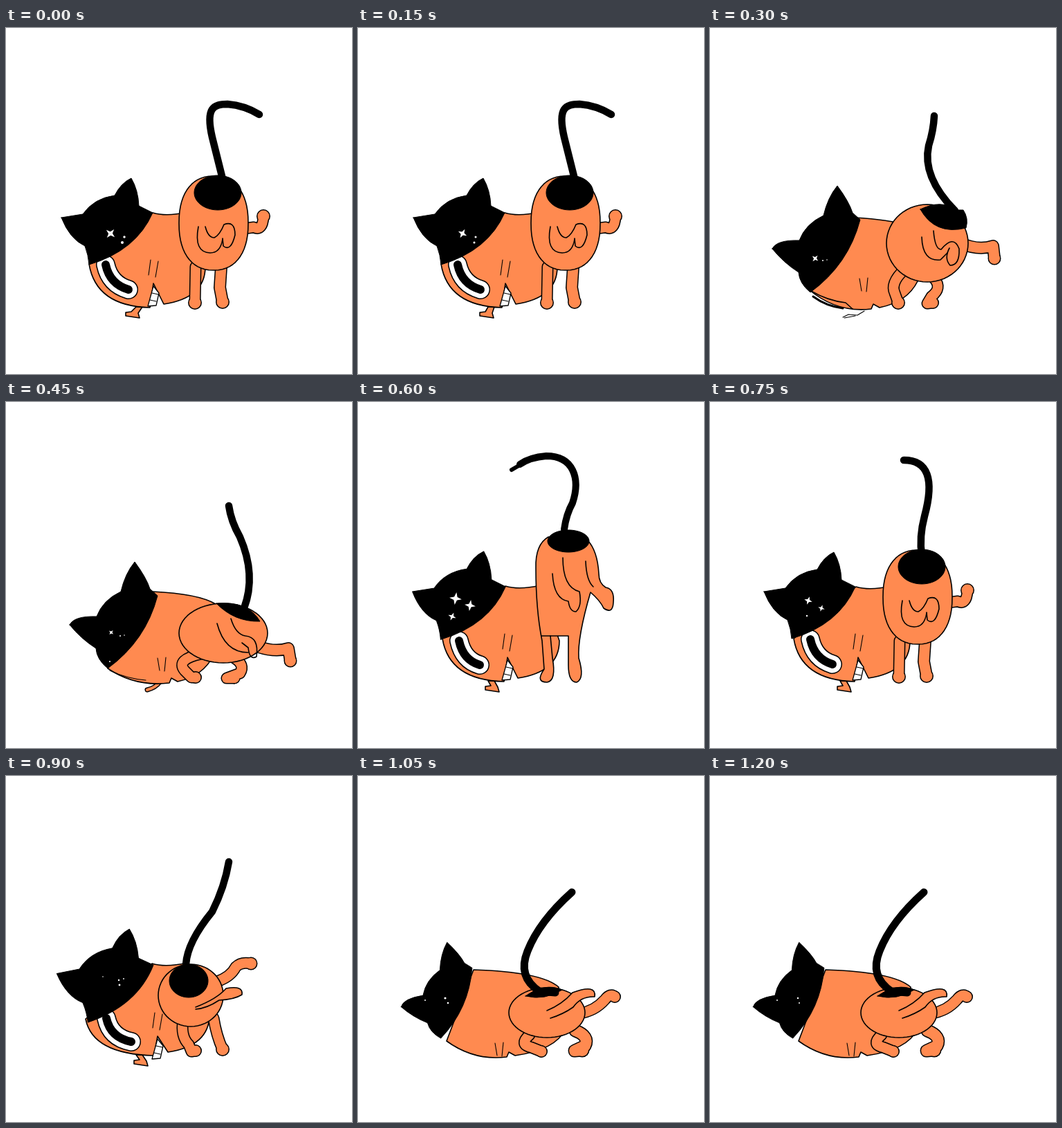
An HTML page for the animation above (1.35 s loop, 500 by 500 pixels).

```html
<!DOCTYPE html>
<html lang="en">
<head>
<meta charset="utf-8">
<title>Tumbling cat</title>
<style>
html, body { margin: 0; width: 100%; height: 100%; overflow: hidden; background: #fff; }
svg { display: block; width: 100%; height: 100%; }
path { fill: none; stroke: #000; stroke-width: 1.6; stroke-linecap: round; stroke-linejoin: round; }
.skin { fill: #ff8a50; }
.fur { fill: #000; stroke-width: 1; }
.white { fill: #fff; stroke-width: 1.3; }
.thin { stroke-width: 1.1; }
.glint { fill: #fff; stroke: none; }
</style>
</head>
<body>
<svg id="stage" viewBox="0 0 500 500"></svg>
<script>
const STEP = 150;
const ORANGE = '#ff8a50';
const stage = document.getElementById('stage');

const shape = (kind, d) => `<path class="${kind}" d="${d}"/>`;
const skin = d => shape('skin', d);
const fur = d => shape('fur', d);
const line = d => shape('line', d);
const thin = d => shape('thin', d);
const stroke = (d, width, color = '#000') =>
  `<path d="${d}" style="stroke:${color};stroke-width:${width}"/>`;
const tail = (d, width = 10.5) => stroke(d, width);
const dot = (x, y, r = 1.2) => `<circle class="glint" cx="${x}" cy="${y}" r="${r}"/>`;

// Moves art around its own centre.
const place = (art, [cx, cy], [x, y], turn = 0, scale = 1) =>
  `<g transform="translate(${x} ${y}) rotate(${turn}) scale(${scale}) translate(${-cx} ${-cy})">${art}</g>`;

// Superellipse: power 2 is an ellipse, more is squarer.
function blob(kind, cx, cy, rx, ry, power = 2) {
  const bend = v => Math.sign(v) * Math.abs(v) ** (2 / power);
  const points = Array.from({ length: 60 }, (_, i) => {
    const a = i * Math.PI / 30;
    return `${cx + rx * bend(Math.cos(a))} ${cy + ry * bend(Math.sin(a))}`;
  });
  return shape(kind, `M${points.join('L')}Z`);
}

function star(x, y, r, turn = 0) {
  const points = Array.from({ length: 8 }, (_, i) => {
    const a = i * Math.PI / 4 + turn, q = i % 2 ? r * 0.36 : r;
    return `${x + q * Math.cos(a)} ${y + q * Math.sin(a)}`;
  });
  return shape('glint', `M${points.join('L')}Z`);
}

// Outlined leg ending in a round paw; the path must end in absolute x y.
function limb(d, end, width = 14, paw = 17) {
  const toe = `M${end}h.01`, knee = `${d} ${end}`;
  return stroke(knee, width + 3) + stroke(toe, paw + 3)
    + stroke(knee, width, ORANGE) + stroke(toe, paw, ORANGE);
}

const UPRIGHT = [148, 275], LYING = [161, 305];

const uprightHead = fur(`M80 274L111 269Q127 246 157 242Q166 224 181 217Q191 234 192 257
  L212 267Q188 322 120 342Q119 328 114 315Q92 305 80 274Z`);
const lyingHead = fur(`M92 322Q98 309 131 310Q140 286 166 274Q172 248 186 231Q203 254 208 270
  L219 280Q202 345 147 385Q131 372 130 356Q108 342 92 322Z`);

const gape = ([x, y], [ex, ey]) => {
  const d = `M${x} ${y}Q${x + 6} ${y + 28} ${ex} ${ey}`;
  return stroke(d, 28) + stroke(d, 25, '#fff') + stroke(d, 12);
};

const uprightFoot = x => skin(`M188 403L${x + 8} 410L${x} 411V416L${x + 20} 419L${x + 18} 412L197 403Z`);

function uprightChest([chinX, chinY], [napeX, napeY], [x, y]) {
  return skin(`M${chinX} ${chinY}Q${chinX + 10} 402 ${x - 5} 404L${x} ${y}L${x + 15} 399
      Q${x + 75} 390 ${x + 75} 345L${napeX + 50} ${napeY - 1}Q${napeX + 20} ${napeY + 6} ${napeX} ${napeY}Z`)
    + shape('white', `M${x} ${y + 4}l8 10l-4 18l-12 1Z`)
    + thin(`M${x - 2} ${y + 14}l9 2m-12 8l9 2`)
    + thin(`M${x + 7} ${y - 32}l-4 23M${x - 4} ${y - 34}l-3 22`);
}

function lyingChest([napeX, napeY], [chinX, chinY], [backX, backY], notch, crease) {
  return skin(`M${napeX} ${napeY}Q${backX - 25} ${napeY + 3} ${backX} ${backY}L300 366
      Q285 396 ${notch + 12} 404L${notch + 3} 399L${notch} 406Q${chinX + 40} 412 ${chinX} ${chinY}Z`)
    + thin(`M${notch - 17} ${crease}l3 18M${notch - 5} ${crease - 1}l-2 20`);
}

const perchedRear = limb('M335 291L358 288Q371 294', '372 272')
  + limb('M274 345L', '273 397') + limb('M311 345L309 375L', '313 396', 15)
  + blob('skin', 300, 282, 50, 68, 2.3)
  + line('M278 287Q271 324 295 325Q310 325 313 305')
  + line('M288 287Q292 303 301 303Q309 299 315 284Q331 278 331 299Q325 324 314 315L313 304')
  + blob('fur', 306, 238, 34, 25);

const perched = (eyes, footX) => uprightFoot(footX)
  + uprightChest([120, 341], [212, 267], [213, 369]) + gape([144, 342], [177, 378])
  + uprightHead + eyes + perchedRear
  + tail('M313 218L298 158C288 115 300 110 320 110Q345 112 366 125');

const dive = () => thin('M192 418l8-4l13 1l10-6M194 419l16-3')
  + lyingChest([209, 274], [143, 378], [285, 285], 233, 362)
  + line('M146 380Q170 394 196 397L206 406') + stroke('M149 388Q168 402 192 405', 3)
  + place(lyingHead, LYING, [159, 302])
  + star(152, 333, 5.5, 0.7) + dot(163, 336, 1) + dot(169, 335, 0.8)
  + limb('M362 311Q388 322 409 315L', '411 333', 15, 16)
  + limb('M282 348Q260 368 267 383L', '272 397')
  + limb('M324 362Q336 376 320 388L314 398L', '322 397', 14, 15)
  + blob('skin', 314, 311, 59, 56)
  + line('M306 302Q307 338 333 335L343 325')
  + line('M323 293Q325 320 334 320Q352 298 360 319Q361 343 347 343Q338 333 346 318')
  + fur('M304 262Q335 247 354 263H366Q374 275 370 289Q325 300 304 262Z')
  + tail('M324 127Q323 148 316 170Q306 215 354 264');

const flat = () => limb('M222 405Q216 413', '204 416', 4, 3)
  + lyingChest([212, 274], [147, 385], [303, 292], 236, 370)
  + thin('M150 388Q175 400 202 402') + lyingHead
  + star(152, 333, 4, 0.7) + dot(165, 338, 1) + dot(171, 337, 0.8) + dot(150, 375, 1)
  + limb('M365 354Q390 362 408 356L', '411 374', 15, 16)
  + limb('M282 364Q245 372 258 388L268 398L', '274 398', 14, 15)
  + limb('M330 370Q346 380 338 392L319 399L', '330 399', 14, 14)
  + blob('skin', 314, 334, 64, 43)
  + line('M305 320Q316 362 350 362')
  + line('M325 313Q332 336 346 338Q366 340 362 368Q352 374 350 355L341 348')
  + fur('M304 291Q350 287 367 317Q330 318 304 291Z')
  + tail('M322 150Q325 172 338 195Q362 250 344 298');

const stretch = () => uprightFoot(184)
  + uprightChest([122, 342], [213, 266], [216, 369]) + gape([146, 345], [176, 380])
  + place(uprightHead, UPRIGHT, [148, 275], 0, 1.02)
  + star(141, 284, 9, 0.15) + star(162, 294, 8, 0.15) + star(136, 310, 6, 0.4)
  + skin(`M275 195Q256 206 257 240Q257 300 266 345L269 386Q256 405 273 405Q287 403 281 370L278 338H304V380
    Q304 405 316 405Q328 400 319 370Q317 340 336 275Q350 287 355 298Q368 307 369 290Q371 270 358 268
    Q348 262 348 248Q346 215 332 200Z`)
  + line('M329 230Q330 258 340 267M265 338H278')
  + line('M281 248Q283 285 304 288Q306 303 315 303Q324 295 320 274Q296 268 296 225')
  + blob('fur', 304, 201, 30, 16)
  + tail('M298 184Q301 162 310 146C322 110 311 78 272 78Q248 80 234 90', 10) + tail('M234 91L222 98', 6);

const swing = () => uprightFoot(184)
  + uprightChest([121, 342], [211, 267], [214, 369]) + gape([145, 343], [177, 379])
  + place(uprightHead, UPRIGHT, [146, 275])
  + star(142, 287, 6, 0.3) + star(161, 298, 5, 0.3) + dot(140, 309)
  + perchedRear + tail('M306 222Q302 195 310 165Q332 84 280 84');

const crouch = () => uprightFoot(185)
  + uprightChest([115, 351], [211, 271], [219, 376]) + gape([145, 350], [181, 384])
  + place(uprightHead, UPRIGHT, [145.5, 284], -2, 1.06)
  + dot(163, 295) + dot(170, 293, 0.9) + dot(164, 302, 1.4) + dot(140, 290, 0.8)
  + limb('M305 297Q325 290 332 276Q340 268', '354 271', 14, 16)
  + limb('M256 352Q252 376 264 388L268 398L', '274 397', 14, 15)
  + limb('M300 350Q304 375', '313 395')
  + blob('skin', 267, 317, 47, 45)
  + skin('M274 334Q305 322 318 307Q343 302 341 316Q330 323 308 324Q290 336 274 337')
  + blob('fur', 264, 296, 28, 24)
  + tail('M322 124Q316 160 298 196Q262 240 260 272');

const sprawl = eyes => lyingChest([167, 280], [128, 383], [290, 305], 215, 386)
  + place(lyingHead, LYING, [119, 308], -10.5, 0.875) + eyes
  + limb('M320 343Q342 340 357 323Q365 313', '371 319', 14, 15)
  + limb('M248 374Q232 388 250 392L', '265 398', 14, 15)
  + limb('M314 368Q335 376 328 390L313 397L', '324 396', 16, 18)
  + blob('skin', 273, 342, 55, 36)
  + skin('M273 339Q295 330 310 313Q345 300 342 319Q322 318 311 334Q297 344 278 350')
  + fur('M242 318Q270 298 295 309Q270 325 242 318Z')
  + tail('M309 168Q262 210 245 253Q230 290 262 311L285 313', 11);

const poses = [
  perched(star(151, 297, 8, 0.7) + dot(171, 302, 1.7) + dot(168, 310, 2), 173),
  perched(star(151, 297, 7, 0.5) + dot(170, 302, 1.5) + dot(168, 310, 1.5), 176),
  dive(), flat(), stretch(), swing(), crouch(),
  sprawl(dot(97, 324, 1) + dot(126, 321, 1.6) + dot(130, 328, 1.3)),
  sprawl(dot(97, 324, 1) + dot(127, 321) + dot(129, 328, 1))
];
stage.innerHTML = poses.map(art => `<g display="none">${art}</g>`).join('');
const groups = [...stage.children];

function draw(ms) {
  const current = Math.floor(ms / STEP) % groups.length;
  groups.forEach((g, i) => g.setAttribute('display', i === current ? 'inline' : 'none'));
}

const start = performance.now();
function tick() {
  draw(performance.now() - start);
  requestAnimationFrame(tick);
}
tick();
</script>
</body>
</html>
```
